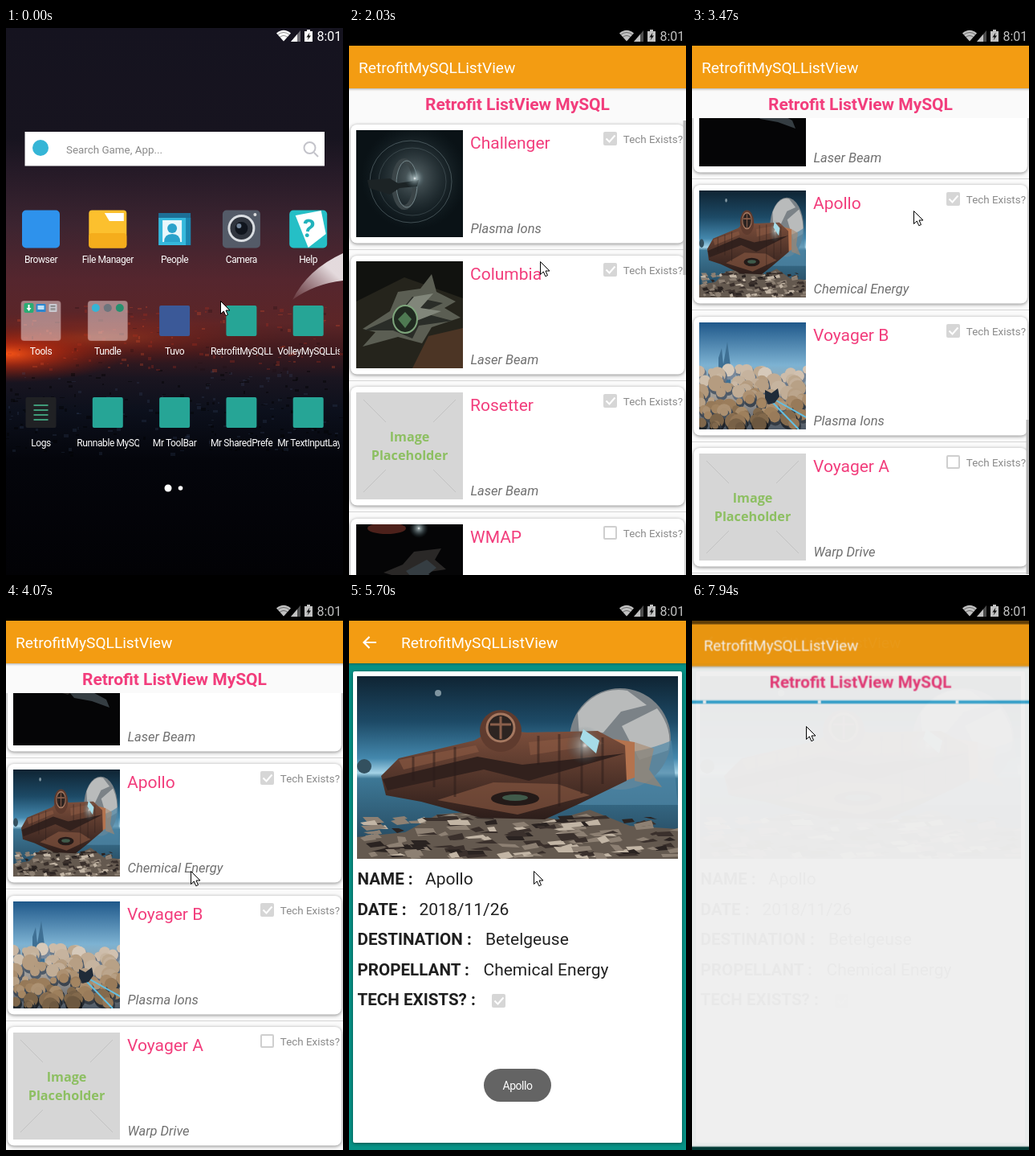
Recreate the animation shown at these times as an HTML page. Size 420x680 px, loop 8000 ms.

```html
<!DOCTYPE html>
<html lang="en">
<head>
<meta charset="utf-8">
<title>List and detail app</title>
<style>
html, body { margin: 0; width: 100%; height: 100%; overflow: hidden; background: #000; }
svg { display: block; }
body > svg { width: 420px; height: 680px; }
text { font-family: Roboto, "Noto Sans", sans-serif; }
.title { font-size: 19.15px; fill: #fff; }
.heading { font-size: 21px; font-weight: 700; fill: #f23d7c; text-anchor: middle; }
.name { font-size: 21px; fill: #f23d7c; }
.fuel { font-size: 16.5px; font-style: italic; fill: #707070; }
.tech { font-size: 13.4px; fill: #8a8a8a; text-anchor: end; }
.label { font-size: 12px; letter-spacing: -.4px; fill: #fff; }
.key { font-size: 20.6px; font-weight: 700; fill: #1f1f1f; }
.val { font-size: 21px; fill: #222; }
.hold { font: 700 16.2px "Open Sans", "Noto Sans", sans-serif; fill: #8dbf62; text-anchor: middle; }
.card { fill: #fff; filter: drop-shadow(0 1.5px 2px #0007); }
.bar { fill: #f39c12; filter: drop-shadow(0 1px 1.5px #0005); }

/* One shared 8 s clock, hard steps */
.k { animation: 8s step-end infinite; }
.zoom { transform-origin: 210px 351px; }
#cursor { animation-name: cursor; }
#status { animation-name: status; }
#black { animation-name: black; }
#blank { animation-name: blank; }
#list { animation-name: list; }
#items { animation-name: items; }
#rows { animation-name: rows; }
#thumb { animation-name: thumb; }
#gaps { animation-name: gaps; }
#detail { animation-name: detail; }
#ripple { animation-name: ripple; }
#dim { animation-name: dim; }
#back { animation-name: back; }
#toast { animation-name: toast; }

@keyframes cursor {
  0% { transform: translate(267px, 339px); }
  2.5% { transform: translate(274px, 348px); }
  5% { transform: translate(281px, 358px); }
  7.5% { transform: translate(285px, 364px); }
  22.9% { transform: translate(268px, 336px); }
  25.3% { transform: translate(238px, 290px); }
  27.8% { transform: translate(244px, 400px); }
  30.2% { transform: translate(252px, 500px); }
  32.8% { transform: translate(260px, 410px); }
  35.4% { transform: translate(268px, 300px); }
  38.1% { transform: translate(274px, 242px); }
  40.6% { transform: translate(276px, 227px); }
  45.8% { transform: translate(262px, 260px); }
  48.3% { transform: translate(242px, 306px); }
  50.8% { transform: translate(230px, 333px); }
  76.1% { transform: translate(205px, 284px); }
  78.7% { transform: translate(150px, 200px); }
  81.2% { transform: translate(84px, 108px); }
  83.8% { transform: translate(38px, 56px); }
  86.4% { transform: translate(24px, 41px); }
  93.9% { transform: translate(44px, 62px); }
  96.6% { transform: translate(100px, 116px); }
  99.2% { transform: translate(142px, 153px); }
}
@keyframes status { 0% { opacity: 1; } 17.9% { opacity: .76; } }
@keyframes black { 0% { opacity: 0; } 17.9% { opacity: 1; } }
@keyframes blank {
  0% { opacity: 0; transform: scale(.92); }
  15.3% { opacity: .45; transform: scale(.94); }
  17.9% { opacity: 1; transform: none; }
  20.4% { opacity: 0; }
}
@keyframes list { 0% { opacity: 0; } 20.4% { opacity: 1; } }
@keyframes items { 0% { opacity: 0; } 25.3% { opacity: 1; } }
@keyframes rows {
  0% { transform: none; }
  30.2% { transform: translateY(-20px); }
  32.8% { transform: translateY(-110px); }
  35.4% { transform: translateY(-290px); }
  38.1% { transform: translateY(-600px); }
  40.6% { transform: translateY(-900px); }
  43.3% { transform: translateY(-1067px); }
  48.3% { transform: translateY(-1064px); }
  50.8% { transform: translateY(-1062px); }
}
@keyframes thumb {
  0% { transform: none; opacity: 1; }
  30.2% { transform: translateY(7px); }
  32.8% { transform: translateY(38px); }
  35.4% { transform: translateY(101px); }
  38.1% { transform: translateY(209px); }
  40.6% { transform: translateY(313px); }
  43.3% { transform: translateY(372px); opacity: 1; }
  48.3% { transform: translateY(371px); opacity: .5; }
  50.8% { transform: translateY(371px); opacity: 0; }
}
@keyframes gaps {
  0% { transform: translateX(-32px); }
  22.9% { transform: translateX(20px); }
  96.6% { transform: translateX(-24px); }
  99.2% { transform: none; }
}
@keyframes detail {
  0% { opacity: 0; transform: scale(.96); }
  68.4% { opacity: .55; transform: scale(.975); }
  70.9% { opacity: 1; transform: none; }
}
@keyframes ripple { 0% { opacity: 0; } 91.3% { opacity: .25; } 93.9% { opacity: 0; } }
@keyframes dim { 0% { opacity: 0; } 96.6% { opacity: .3; } 99.2% { opacity: .6; } }
@keyframes back {
  0% { opacity: 0; }
  96.6% { opacity: .45; transform: scale(.95); }
  99.2% { opacity: .93; transform: scale(.987); }
}
@keyframes toast {
  0% { opacity: 0; }
  61.1% { opacity: .3; }
  63.6% { opacity: .85; }
  66% { opacity: 1; }
  86.4% { opacity: .43; }
  88.9% { opacity: 0; }
}
</style>
</head>
<body>
<svg viewBox="0 0 420 680">
  <defs>
    <linearGradient id="wall" x2="0" y2="1">
      <stop offset="0" stop-color="#15131f"/><stop offset=".2" stop-color="#17141f"/>
      <stop offset=".26" stop-color="#251a27"/><stop offset=".36" stop-color="#3c2430"/>
      <stop offset=".46" stop-color="#55262e"/><stop offset=".54" stop-color="#5c2527"/>
      <stop offset=".59" stop-color="#3f1a1e"/><stop offset=".64" stop-color="#1a1520"/>
      <stop offset=".7" stop-color="#0c101c"/><stop offset=".79" stop-color="#04050b"/>
      <stop offset="1" stop-color="#020205"/>
    </linearGradient>
    <radialGradient id="lava">
      <stop offset="0" stop-color="#ff5a18"/><stop offset=".4" stop-color="#d5300c" stop-opacity=".6"/>
      <stop offset="1" stop-color="#901808" stop-opacity="0"/>
    </radialGradient>
    <radialGradient id="glow">
      <stop offset="0" stop-color="#fff"/><stop offset=".15" stop-color="#b9cdd0" stop-opacity=".7"/>
      <stop offset="1" stop-color="#35525a" stop-opacity="0"/>
    </radialGradient>
    <linearGradient id="ring" x1="0" x2="1" y1="1" y2="0">
      <stop offset="0" stop-color="#d9c4c8" stop-opacity=".1"/><stop offset=".7" stop-color="#f4eef0" stop-opacity=".9"/>
    </linearGradient>
    <linearGradient id="sky" x2="0" y2="1">
      <stop offset="0" stop-color="#0f2433"/><stop offset=".25" stop-color="#1d4a66"/>
      <stop offset=".45" stop-color="#4488ad"/><stop offset=".53" stop-color="#a4d2e6"/>
      <stop offset=".56" stop-color="#3d7896"/><stop offset="1" stop-color="#213f54"/>
    </linearGradient>
    <linearGradient id="air" x2="0" y2="1">
      <stop offset="0" stop-color="#1f588a"/><stop offset=".4" stop-color="#7db2d2"/>
      <stop offset=".7" stop-color="#a39c95"/><stop offset="1" stop-color="#4d5865"/>
    </linearGradient>
    <linearGradient id="hull" x2="0" y2="1">
      <stop offset="0" stop-color="#7d4f3c"/><stop offset="1" stop-color="#2c1d1a"/>
    </linearGradient>

    <symbol id="crag" viewBox="0 0 400 227" preserveAspectRatio="none">
      <rect width="400" height="227" fill="url(#sky)"/>
      <circle cx="101" cy="21" r="4" fill="#7f95a0"/>
      <circle cx="9" cy="112" r="9" fill="#33505f"/>
      <circle cx="328" cy="78" r="63" fill="#7b8287"/>
      <path d="M275 46q24-34 62-28l24 18-32 8-22 26-30 4zM330 62l44-22q20 26 14 52l-36 12z" fill="#c9cac8" opacity=".8"/>
      <path d="M264 88q60 20 128-8l8 80H264z" fill="#4f87a5" opacity=".7"/>
      <path d="M0 227V200l60-6 40-22 70-6 80 12 40-12 50 20 60 4v37z" fill="#64594f"/>
      <g id="rocks"></g>
      <path d="M320 78l26 4v44l-30 10z" fill="#b4734e"/>
      <path d="M346 82l24 8-6 26 16 22-34-8z" fill="#a9876c" opacity=".6"/>
      <path d="M30 124l22-22 94-22 24-14 42 4 88-2 34 18 2 44-62 30-40 18-80-2-74-20-44-8z" fill="url(#hull)"/>
      <path d="M32 128l118-28 56 10 128-14-120 34-56-14-120 26z" fill="#32211d"/>
      <path d="M52 104l96-18 4 8-94 22zM214 82l78-8 16 10-92 14zM100 154l70-22 80 2 40 14-90 24z" fill="#8c5b44" opacity=".6"/>
      <path d="M70 100v30M96 94v44M122 88v62M226 74v36M252 72v90M280 70v76M306 76v58" stroke="#2c1d1a" stroke-width="3" opacity=".5"/>
      <circle cx="284" cy="86" r="24" fill="url(#glow)" opacity=".8"/>
      <path d="M282 66l20 14-4 16-20-18z" fill="#a6dce8"/>
      <circle cx="179" cy="68" r="26" fill="#5f3b2e"/>
      <circle cx="179" cy="64" r="17" fill="#2d2421" stroke="#a57860" stroke-width="3"/>
      <path d="M166 60h26M179 50v28" stroke="#8a5f4b" stroke-width="3"/>
      <ellipse cx="197" cy="152" rx="30" ry="9" fill="#241a18"/>
      <ellipse cx="197" cy="151" rx="16" ry="4" fill="#405a4a"/>
    </symbol>

    <symbol id="gate" viewBox="0 0 133 133">
      <rect width="133" height="133" fill="#0a1216"/>
      <circle cx="72" cy="58" r="66" fill="url(#glow)" opacity=".5"/>
      <g fill="none" stroke="#8ea4a8">
        <circle cx="68" cy="64" r="51" opacity=".4"/><circle cx="70" cy="64" r="42" opacity=".25"/>
        <ellipse cx="60" cy="67" rx="13" ry="29" stroke="#3b4548" stroke-width="6"/>
        <ellipse cx="63" cy="67" rx="13" ry="29" opacity=".7"/>
      </g>
      <path d="M14 62l28-2 10 6 26-4-2 8-22 2-12 8-26-8z" fill="#1c2325"/>
      <circle cx="73" cy="60" r="13" fill="url(#glow)"/>
    </symbol>

    <symbol id="raider" viewBox="0 0 133 133">
      <rect width="133" height="133" fill="#25241c"/>
      <path d="M0 0h133v46L60 20 0 50z" fill="#11120f"/>
      <path d="M70 133l20-40 43-10v50z" fill="#4c3525"/>
      <path d="M8 84l34-22 10-24 28-4 14-18 6 22 24 12-14 8 20 12-36 12-12 20-30-8-44 12 16-18z" fill="#5b5e53"/>
      <path d="M10 86l40-18 20-24 38 8-26 12 38 10-42 6-8 16-24-10z" fill="#2a2d28"/>
      <path d="M48 72l24-28 24-4-16 18 26 4-36 14z" fill="#81867a"/>
      <ellipse cx="61" cy="72" rx="15" ry="17" fill="#202a20" stroke="#7da57b" stroke-width="2"/>
      <path d="M52 72l9-9 8 9-8 11z" fill="#4e7a52"/>
    </symbol>

    <symbol id="dock" viewBox="0 0 133 133">
      <rect width="133" height="133" fill="#050506"/>
      <ellipse cx="38" cy="5" rx="24" ry="7" fill="#6d2e24" opacity=".7"/>
      <circle cx="78" cy="5" r="12" fill="url(#glow)"/>
      <path d="M34 60l24-10 14-16 34-4-8 14 14 12-28 4-16 10z" fill="#2a2827"/>
      <path d="M62 58l26-14 12 10-10 8 26 14 4 10-22-8-22-4z" fill="#353d42"/>
    </symbol>

    <symbol id="clouds" viewBox="0 0 133 133">
      <rect width="133" height="133" fill="url(#air)"/>
      <path d="M24 82V44l4-12 2 20 5-28 4 30v30z" fill="#3f7094"/>
      <g id="puffs"></g>
      <path d="M94 96l39 22M90 98l34 35" stroke="#62bfe2" stroke-width="2"/>
      <path d="M82 84l8 4 8-6 2 10-6 8-8 2-4-8z" fill="#202b38"/>
    </symbol>

    <symbol id="empty" viewBox="0 0 133 133">
      <rect width="133" height="133" fill="#d6d6d6"/>
      <path d="M9 9l28 28M124 9L96 37M9 124l28-28M124 124L96 96" stroke="#c2c2c2"/>
      <text class="hold" x="66.5" y="61">Image</text>
      <text class="hold" x="66.5" y="84">Placeholder</text>
    </symbol>

    <g id="on"><rect width="17" height="17" rx="2" fill="#d6d6d6"/><path d="M3.5 8.5l4 4 7-8" fill="none" stroke="#fff" stroke-width="2"/></g>
    <rect id="off" x="1" y="1" width="15" height="15" rx="1" fill="none" stroke="#cfcfcf" stroke-width="2"/>
  </defs>

  <g id="home">
    <rect width="420" height="680" fill="url(#wall)"/>
    <ellipse cx="0" cy="405" rx="150" ry="36" fill="url(#lava)"/>
    <ellipse cx="120" cy="385" rx="230" ry="34" fill="url(#lava)" opacity=".35"/>
    <path d="M357 338Q376 300 420 280v34q-36 4-63 24z" fill="url(#ring)"/>
    <g id="city"></g>
    <rect x="23.500" y="129" width="373.500" height="42.500" fill="#fff"/>
    <circle cx="43" cy="149" r="10" fill="#35b5d6"/>
    <text x="75" y="155.5" font-size="13.4" fill="#8a8a8a">Search Game, App...</text>
    <path d="M384 155l5 5M385.500 149a7 7 0 1 1-14 0a7 7 0 1 1 14 0" fill="none" stroke="#c3c3ca" stroke-width="2"/>
    <g id="apps"></g>
    <circle cx="202" cy="572" r="4.500" fill="#fff"/><circle cx="217.500" cy="572" r="2.800" fill="#fff"/>
  </g>

  <rect id="blank" class="k zoom" x="4" y="30" width="416" height="644" fill="#fafafa"/>

  <g id="list" class="k">
    <g id="shell">
      <rect x="-6" y="22" width="432" height="658" fill="#fafafa"/>
      <rect class="bar" x="-6" y="22" width="432" height="53"/>
      <text class="title" x="12" y="56">RetrofitMySQLListView</text>
      <text class="heading" x="210" y="102">Retrofit ListView MySQL</text>
      <rect x="-6" y="118" width="432" height="4" fill="#37a8d4"/>
      <path id="gaps" class="k" d="M43 118h4v4h-4zM188 118h4v4h-4zM362 118h4v4h-4z" fill="#fafafa"/>
    </g>
    <g id="items" class="k">
      <svg y="112" width="420" height="568">
        <rect width="420" height="568" fill="#fafafa"/>
        <g id="rows" class="k"></g>
      </svg>
      <rect id="thumb" class="k" x="416.500" y="115" width="3.500" height="192" fill="#b4b4b4"/>
    </g>
  </g>

  <g id="detail" class="k zoom">
    <rect y="22" width="420" height="658" fill="#079286"/>
    <rect class="bar" y="22" width="420" height="53"/>
    <path d="M34 49H19M25.500 42l-7 7 7 7" fill="none" stroke="#fff" stroke-width="2.200"/>
    <circle id="ripple" class="k" cx="26" cy="49" r="24" fill="#fff"/>
    <text class="title" x="65" y="56">RetrofitMySQLListView</text>
    <rect class="card" x="5" y="85" width="410" height="586" rx="2"/>
    <use href="#crag" x="10" y="91" width="400" height="227"/>
    <g id="facts"></g>
    <use href="#on" x="178" y="486"/>
  </g>
  <rect id="dim" class="k" y="22" width="420" height="658"/>
  <g id="back" class="k zoom"><use href="#shell"/></g>

  <g id="toast" class="k">
    <rect x="168" y="579" width="84" height="41" rx="20.500" fill="#646464"/>
    <text x="210" y="605" font-size="14" letter-spacing="-.5" fill="#fff" text-anchor="middle">Apollo</text>
  </g>

  <rect id="black" class="k" width="420" height="22"/>
  <g id="status" class="k" fill="#fff">
    <path d="M337 6.500q9-7.500 18 0l-9 10z"/>
    <path d="M338.500 8.500q7.500-6 15 0M341 11.500q5-4 10 0" fill="none" stroke="#000" stroke-opacity=".45"/>
    <path d="M355 17L367 3v14z" opacity=".4"/><path d="M355 17l8-9.300V17z"/>
    <path d="M372 4h3V2h4v2h3v13h-10z"/>
    <path d="M378.500 5.500l-4 6h2.500l-1.500 4 4.500-6h-2.500z" fill="#111"/>
    <text x="387.500" y="16" font-size="16">8:01</text>
  </g>
  <g id="cursor" class="k">
    <path d="M.5.5v16l3.800-3.500 2.500 5.700 2.700-1.200-2.500-5.500h5z" fill="#fff" stroke="#000"/>
  </g>
</svg>
<script>
const fill = (id, html) => document.getElementById(id).innerHTML = html;
const box = (x, y, w, h, color, r = 0) =>
  `<rect x="${x}" y="${y}" width="${w}" height="${h}" rx="${r}" fill="${color}"/>`;
const dot = (x, y, r, color) => `<circle cx="${x}" cy="${y}" r="${r}" fill="${color}"/>`;
const shape = (d, color) => `<path d="${d}" fill="${color}"/>`;
const repeat = (n, draw) => Array.from({ length: n }, (_, i) => draw(i)).join('');

let seed = 7;
const rnd = (from, to) =>
  Math.round(from + (to - from) * (seed = seed * 16807 % 2147483647) / 2147483647);
const pick = list => list[rnd(0, list.length - 1)];

// Icons are drawn around their own centre
const plain = color => box(-19, -19, 38, 38, color, 2);
const folder = inner => box(-25, -25, 50, 50, '#e4c5c866', 4) +
  box(-24.5, -24.5, 49, 49, '#ffffff33', 4) + inner;
const icon = {
  browser: box(-23.5, -23.5, 47, 47, '#2e92ec', 5),
  files: box(-23.5, -23.5, 47, 47, '#fcc02e', 4) + box(-23.5, 5, 47, 18.5, '#f5ad1c', 4) +
    shape('M-4-20h24v10h-18z', '#fff'),
  people: box(-20, -20, 40, 7, '#1d6f96') + box(-20, -14, 40, 34, '#35b8dc') +
    box(-15, -11, 24, 27, '#e9f7fb') + box(14, -14, 6, 34, '#1b86b0') +
    dot(-3, -1, 6, '#2aa2cb') + shape('M-13 16q0-10 10-10t10 10z', '#2aa2cb'),
  camera: box(-23.5, -23.5, 47, 47, '#545b68', 5) + dot(0, -1, 17, '#d9dde1') +
    dot(0, -1, 14, '#30353e') + dot(0, -1, 8, '#10151d') + dot(-3, -4, 3, '#73859a') + dot(17, -18, 2, '#ddd'),
  help: box(-23.5, -23.5, 47, 47, '#25bfc6', 5) + shape('M-16-17L16-23 22 6 0 23z', '#fff') +
    '<text x="0" y="10" font-size="31" font-weight="700" fill="#22b3bc" text-anchor="middle" transform="rotate(8)">?</text>',
  tools: folder(box(-21, -22, 12, 12, '#29ad73', 2) + shape('M-16-20h2v4h2l-3 4-3-4h2z', '#fff') +
    box(-6, -21, 12, 10, '#2b87d0', 1) + box(-4, -19, 8, 5, '#bfe0f5') +
    box(10, -21, 10, 10, '#c9c9d0', 1) + box(12, -19, 6, 1.5, '#777') + box(12, -16, 6, 3, '#999')),
  trio: folder(dot(-15, -16, 5, '#35b5d6') + dot(0, -16, 5, '#6d757d') + dot(15, -16, 5, '#26906f')),
  blue: plain('#3b5998'),
  teal: plain('#26a596'),
  logs: box(-19, -19, 38, 38, '#202124', 2) +
    [-9, -3, 3, 9].map(y => box(-9, y - 1, 18, 2, '#3f9a78')).join('')
};
const apps = [
  [250, 291.5, ['browser', 'Browser'], ['files', 'File Manager'], ['people', 'People'], ['camera', 'Camera'], ['help', 'Help']],
  [364, 405.5, ['tools', 'Tools'], ['trio', 'Tundle'], ['blue', 'Tuvo'], ['teal', 'RetrofitMySQLListView'], ['teal', 'VolleyMySQLListView']],
  [478, 519.5, ['logs', 'Logs'], ['teal', 'Runnable MySQL'], ['teal', 'Mr ToolBar'], ['teal', 'Mr SharedPreferences'], ['teal', 'Mr TextInputLayout']]
];
fill('apps', apps.map(([y, base, ...cells]) => cells.map(([kind, name], i) => {
  const x = 43.5 + 83.3 * i;
  const long = name.length > 12;
  return `<g transform="translate(${x} ${y})">${icon[kind]}</g>` +
    `<svg x="${x - 39}" y="${base - 14}" width="78" height="20">` +
    `<text class="label" x="${long ? 0.5 : 39}" y="14" text-anchor="${long ? 'start' : 'middle'}">${name}</text></svg>`;
}).join('')).join(''));

// Embers above, dark blocks and cool lights on the plain below
fill('city', repeat(420, () => {
  const y = rnd(345, 530);
  const color = y < 425 ? pick(['#e0502c44', '#b8301c44', '#1a0c1044']) : pick(['#40567a30', '#00000066']);
  return box(rnd(0, 420), y, rnd(2, 6), rnd(1, 4), color);
}));

fill('rocks', repeat(150, () => {
  const y = rnd(172, 224), w = rnd(8, 26);
  return shape(`M${rnd(0, 390)} ${y}l${w} ${rnd(-5, 1)} ${rnd(2, 8)} ${rnd(3, 7)} ${-w} ${rnd(-1, 3)}z`,
    pick(['#2a2321', '#3a302c', '#8d8073', '#c2b5a5']));
}));

// Clouds darken towards the bottom
fill('puffs', repeat(110, i => {
  const y = 58 + i * .66;
  const x = rnd(-4, 137), r = rnd(5, 11);
  const light = 76 - i * .35 + rnd(-8, 8);
  return dot(x, y + 3, r, `hsl(212 14% ${light - 24}%)`) + dot(x - 1, y, r - 1, `hsl(32 26% ${light}%)`);
}));

const ships = [
  ['Challenger', 'Plasma Ions', 'gate', 1],
  ['Columbia', 'Laser Beam', 'raider', 1],
  ['Rosetter', 'Laser Beam', 'empty', 1],
  ['WMAP', 'Warp Drive', 'dock', 0],
  ['Horizon', 'Plasma Ions', 'empty', 1],
  ['Meridian', 'Chemical Energy', 'gate', 0],
  ['Pioneer', 'Laser Beam', 'dock', 0],
  ['Apollo', 'Chemical Energy', 'crag', 1],
  ['Voyager B', 'Plasma Ions', 'clouds', 1],
  ['Voyager A', 'Warp Drive', 'empty', 0]
];
fill('rows', ships.map(([name, fuel, pic, tech], i) =>
  `<g transform="translate(0 ${Math.round(8 + 163.2 * i)})">
    <rect class="card" x="2" width="416" height="147.5" rx="8"/>
    <use href="#${pic}" x="9" y="7" width="133" height="133"/>
    <text class="name" x="151" y="29.5">${name}</text>
    <text class="fuel" x="151.5" y="135">${fuel}</text>
    <use href="#${tech ? 'on' : 'off'}" x="317" y="9"/>
    <text class="tech" x="416" y="23">Tech Exists?</text>
    ${box(0, 155, 420, 1, '#d6d6d6')}
  </g>`).join(''));

const facts = [
  ['NAME', 'Apollo', 95], ['DATE', '2018/11/26', 87.5], ['DESTINATION', 'Betelgeuse', 170],
  ['PROPELLANT', 'Chemical Energy', 167.5], ['TECH EXISTS?', '', 0]
];
fill('facts', facts.map(([key, val, x], i) => {
  const y = 350 + 37.5 * i;
  return `<text class="key" x="10.5" y="${y}">${key} :</text><text class="val" x="${x}" y="${y}">${val}</text>`;
}).join(''));
</script>
</body>
</html>
```
